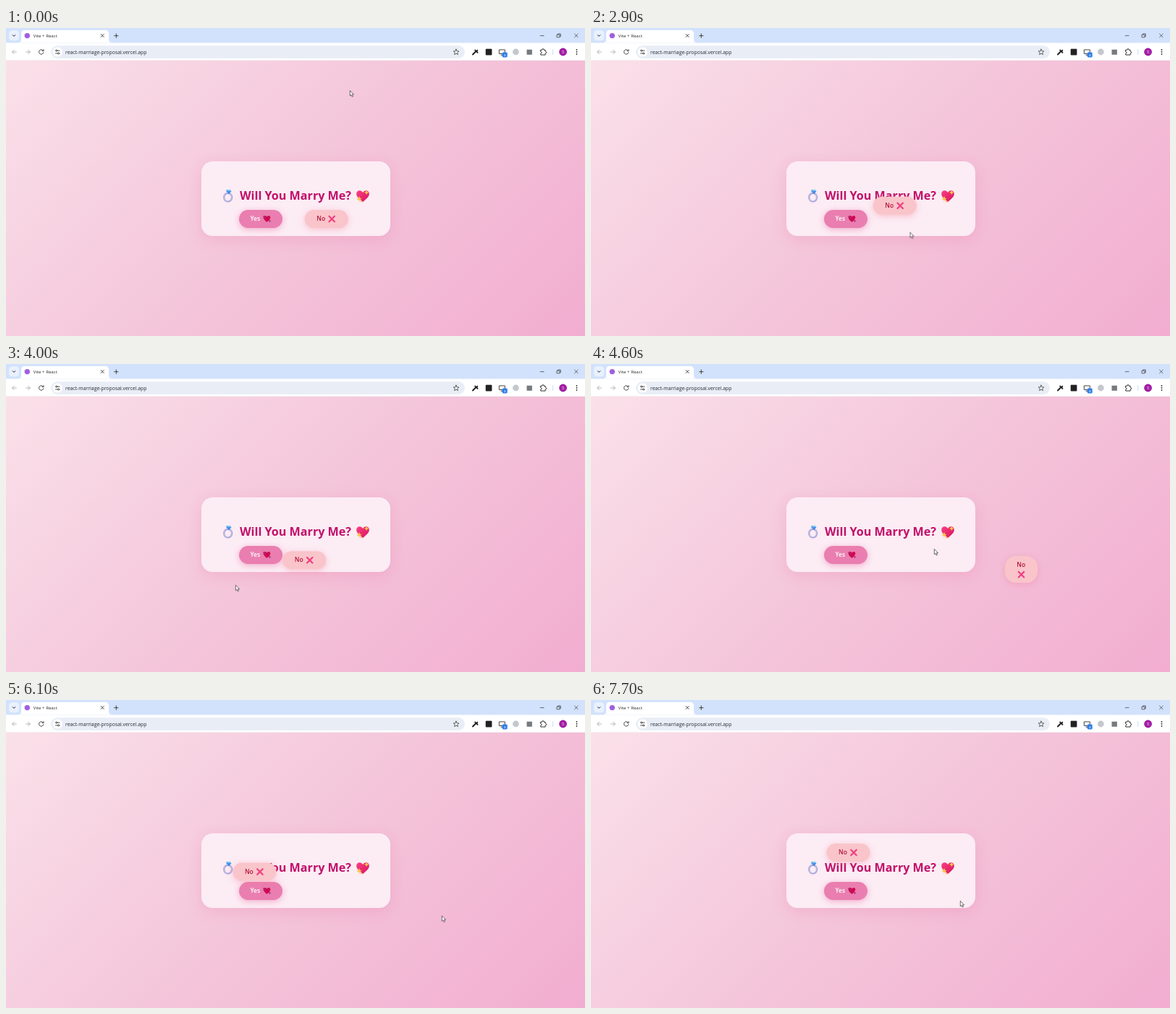
These frames come from a looping animation (800 by 425 pixels, 8 s). An HTML page:

```html
<!DOCTYPE html>
<html lang="en">
<head>
<meta charset="utf-8">
<title>Proposal page</title>
<style>
html, body { margin: 0; width: 100%; height: 100%; overflow: hidden; }
body { font-family: "Open Sans", "Noto Sans", sans-serif; background: #fff; }
.stage { position: relative; width: 800px; height: 425px; overflow: hidden; }
.stage > * { position: absolute; }
.chrome { left: 0; top: 0; }
.page {
  left: 0; top: 45px; width: 800px; height: 380px;
  background: linear-gradient(135deg, #fae0e9, #f4c5da 50%, #f2add0);
}
.card {
  left: 269.5px; top: 184px; width: 261px; height: 102.6px;
  border-radius: 15.6px; background: #fcecf4;
  box-shadow: 0 5px 20px rgba(225, 60, 130, .15);
}
h1 {
  left: 200px; top: 219px; width: 400px; margin: 0;
  font-size: 16.15px; line-height: 24px; font-weight: 700;
  text-align: center; white-space: nowrap; color: #c2106a;
}
.btn {
  display: flex; flex-wrap: wrap; justify-content: center; column-gap: 4px;
  box-sizing: border-box; padding: 6.2px 15px; border-radius: 15.6px;
  font-size: 8.5px; line-height: 12.5px; font-weight: 600;
}
.btn svg { width: 11px; height: 12.5px; }
.yes {
  left: 321.5px; top: 251px; width: 60.5px; color: #fff; background: #ea7eb0;
  box-shadow: 0 2px 8px rgba(230, 70, 140, .38);
}
.no {
  left: 0; top: 0; width: 60px; color: #b3123f; background: #f9c5ca;
  box-shadow: 0 2px 8px rgba(244, 120, 150, .38);
  animation: dodge 8s step-end infinite;
}
.arrow, .beam { left: 0; top: 0; overflow: visible; }
.arrow { animation: point 8s step-end infinite; }
.beam { opacity: 0; animation: beam 8s step-end infinite; }

/* each stop is one 100 ms step: 1.25% of the loop */
@keyframes dodge {
  0% { transform: translate(412.7px, 251px); width: 60px; }
  36.25% { transform: translate(389.7px, 232.7px); }
  37.5% { transform: translate(373px, 219px); }
  38.75% { transform: translate(368px, 215px); }
  40% { transform: translate(367px, 214px); }
  43.75% { transform: translate(335px, 246px); }
  45% { transform: translate(304px, 274px); }
  46.25% { transform: translate(296px, 281px); }
  50% { transform: translate(382.2px, 258.2px); }
  51.25% { transform: translate(440px, 242px); }
  52.5% { transform: translate(462px, 236px); width: 60px; }
  57.5% { transform: translate(572px, 265px); width: 44.5px; }
  58.75% { transform: translate(648px, 284px); }
  60% { transform: translate(673.7px, 291px); }
  73.75% { transform: translate(545px, 267px); width: 44.5px; }
  75% { transform: translate(375px, 236px); width: 60px; }
  76.25% { transform: translate(313.4px, 224.5px); }
  77.5% { transform: translate(311px, 224px); }
  83.75% { transform: translate(408px, 243px); width: 60px; }
  85% { transform: translate(476px, 256px); width: 44.5px; }
  86.25% { transform: translate(496px, 260.3px); }
  87.5% { transform: translate(500px, 261px); width: 44.5px; }
  93.75% { transform: translate(410px, 229px); width: 60px; }
  95% { transform: translate(342px, 204px); }
  96.25%, 100% { transform: translate(325.5px, 198px); width: 60px; }
}
@keyframes point {
  0% { transform: translate(475px, 86px); opacity: 1; }
  15% { transform: translate(395px, 261px); }
  36.25% { transform: translate(440.5px, 281.5px); }
  37.5% { transform: translate(432px, 276px); }
  38.75% { transform: translate(424px, 268px); }
  40% { transform: translate(419px, 260px); }
  43.75% { transform: translate(390px, 236px); }
  45% { transform: translate(370px, 256px); }
  46.25% { transform: translate(358px, 270px); }
  50% { transform: translate(317px, 304.8px); }
  51.25% { transform: translate(340px, 296px); }
  52.5% { transform: translate(390px, 276px); }
  57.5% { transform: translate(474px, 255px); }
  58.75% { transform: translate(486px, 252px); }
  60% { transform: translate(490px, 251px); }
  66.25% { transform: translate(495px, 251px); }
  67.5% { transform: translate(530px, 264px); }
  70% { transform: translate(590px, 284px); }
  71.25% { transform: translate(650px, 298px); }
  72.5% { transform: translate(680px, 304px); }
  73.75% { transform: translate(676px, 304px); }
  75% { transform: translate(640px, 301px); }
  76.25% { transform: translate(602px, 297.5px); }
  77.5% { transform: translate(580px, 294px); }
  80% { transform: translate(450px, 262px); }
  83.75% { transform: translate(371px, 236px); opacity: 1; }
  85% { opacity: 0; }
  92.5% { transform: translate(470px, 263px); opacity: 1; }
  93.75% { transform: translate(505px, 276px); }
  95%, 100% { transform: translate(510px, 277px); opacity: 1; }
}
@keyframes beam { 85% { opacity: 1; } 92.5%, 100% { opacity: 0; } }
</style>
</head>
<body>
<div class="stage">
  <div class="page"></div>
  <div class="card"></div>
  <h1>Will You Marry Me?</h1>

  <svg style="left:298px;top:221px" width="18" height="20" viewBox="0 0 18 20">
    <ellipse cx="8.6" cy="12.6" rx="5.5" ry="5.8" fill="none" stroke="#9b93d2" stroke-width="2.3"/>
    <ellipse cx="8.3" cy="12.2" rx="5.5" ry="5.7" fill="none" stroke="#cbc4ea" stroke-width="1.2"/>
    <path d="M5.8 3.6 7.6 2h4.2l1.6 2.2-3.4 4.2Z" fill="#3f8ee4"/>
    <path d="M5.8 3.6 7.6 2h4.2l1.6 2.2Z" fill="#86c8f7"/>
  </svg>
  <svg style="left:483px;top:221.5px" width="20" height="20" viewBox="0 0 20 20">
    <defs>
      <linearGradient id="rose" x1="0" y1="0" x2="1" y2="1">
        <stop offset="0" stop-color="#f9417f"/><stop offset="1" stop-color="#d9105f"/>
      </linearGradient>
      <path id="heart" d="M10 18C3 12.5 1.2 9.6 1.2 6.7 1.2 3.7 3.3 2.2 5.6 2.2 7.6 2.2 9 3.4 10 5 11 3.4 12.4 2.2 14.4 2.2c2.3 0 4.4 1.5 4.4 4.5 0 2.9-1.8 5.8-8.8 11.3Z"/>
      <path id="spark" d="M0-4Q.6-.6 4 0 .6.6 0 4-.6.6-4 0-.6-.6 0-4Z"/>
    </defs>
    <use href="#heart" fill="url(#rose)"/>
    <g fill="#fbc54a">
      <use href="#spark" transform="translate(5 13.8)"/>
      <use href="#spark" transform="translate(15.2 5) scale(.8)"/>
      <use href="#spark" transform="translate(8.2 17.4) scale(.45)"/>
    </g>
  </svg>

  <div class="btn yes"><span>Yes</span>
    <svg viewBox="0 0 20 22">
      <path d="M1 5 19 18" stroke="#7b3d9c" stroke-width="2"/>
      <use href="#heart" y="1" fill="#d0094f"/>
      <path d="m1 3 5 6M1 6l6 3" stroke="#8d3f94" stroke-width="1.6"/>
      <path d="m14 14 5 1-1 5Z" fill="#a52c78"/>
    </svg>
  </div>
  <div class="btn no"><span>No</span>
    <svg viewBox="0 0 22 25">
      <path d="m3.5 5.5 15 15m0-15-15 15" stroke="#ef3f80" stroke-width="4.4" stroke-linecap="round"/>
    </svg>
  </div>

  <svg class="chrome" width="800" height="45" viewBox="0 0 800 45" fill="none" stroke-linecap="round" stroke-linejoin="round">
    <path d="M0 0h800v45H0z" fill="#fff"/>
    <path d="M0 0h800v20.5H0z" fill="#d3e2fc"/>
    <rect x="4" y="3.3" width="14" height="14" rx="4.5" fill="#e9f1fe"/>
    <path d="m9.2 9.6 1.8 1.8 1.8-1.8" stroke="#222" stroke-width="1"/>
    <path d="M16 20.5q5 0 5-5V8q0-5 5-5H137q5 0 5 5v7.5q0 5 5 5Z" fill="#fff"/>
    <circle cx="29.3" cy="10.6" r="3.7" fill="#a05fe0"/>
    <g stroke="#333" stroke-width=".9">
      <path d="m131.2 8.5 4 4m0-4-4 4M152.3 8v5.4m-2.7-2.7h5.4"/>
      <path d="M738.3 10.6h4.8m42.5-2.4 4.6 4.6m0-4.6-4.6 4.6" stroke-width=".7"/>
      <path d="M761.4 9.2h3.7v3.6h-3.7zM762.6 8.9V8h3.7v3.7h-.9" stroke-width=".7"/>
    </g>
    <g stroke="#b3b5b8" stroke-width="1">
      <path d="M14.3 33H8.7m2.6-2.7L8.6 33l2.7 2.7M27.7 33h5.6m-2.6-2.7 2.7 2.7-2.7 2.7"/>
    </g>
    <path d="M51.5 31.3a3.2 3.2 0 1 0 .4 2.5M52 29.7v2h-2" stroke="#444" stroke-width="1"/>
    <rect x="62" y="24.3" width="572" height="17.6" rx="8.8" fill="#e9eef6"/>
    <circle cx="71.2" cy="33" r="6.6" fill="#fff"/>
    <g stroke="#444" stroke-width=".9">
      <path d="M68.5 31.2h.2m2.8 0h2.6M68.4 35h2.5m2.8 0h.3"/>
      <circle cx="69.8" cy="31.2" r="1.1"/><circle cx="72.5" cy="35" r="1.1"/>
    </g>
    <path d="m622 29.2 1.1 2.6 2.8.2-2.1 1.9.6 2.8-2.4-1.5-2.4 1.5.6-2.8-2.1-1.9 2.8-.2Z" stroke="#444" stroke-width=".8"/>
    <path d="m645 36.5 4-4" stroke="#222" stroke-width="2"/>
    <path d="m648.2 30.6 3.3 3.3m-1.5-1.7 1.3-1.3" stroke="#222" stroke-width="2"/>
    <rect x="662.7" y="28.8" width="8.7" height="8.7" rx="1" fill="#222"/>
    <path d="M681.7 30h7.6v5.5h-7.6zM684 37.4h2" stroke="#444" stroke-width="1"/>
    <rect x="685.7" y="33.4" width="7" height="7" rx="1.6" fill="#2b7de9"/>
    <circle cx="704.4" cy="33" r="4.4" fill="#c4c8cd"/>
    <rect x="719.5" y="29.8" width="7.4" height="7" fill="#777a7e"/>
    <path d="M738.8 30.4h2v-.5a1.2 1.2 0 0 1 2.4 0v.5h2v2.1h.4a1.2 1.2 0 0 1 0 2.4h-.4v2.2h-6.4v-2a1.3 1.3 0 0 0 0-2.6Z" stroke="#333" stroke-width="1"/>
    <path d="M755.7 29.5v7" stroke="#c9dbf7" stroke-width="1"/>
    <circle cx="769.6" cy="33" r="5.4" fill="#a220a6"/>
    <g fill="#333">
      <circle cx="788.5" cy="30" r=".9"/><circle cx="788.5" cy="33" r=".9"/><circle cx="788.5" cy="36" r=".9"/>
    </g>
    <g fill="#262a30">
      <text x="37.8" y="12.8" font-size="6.1">Vite + React</text>
      <text x="82" y="35.5" font-size="6.88">react-marriage-proposal.vercel.app</text>
      <text x="769.6" y="34.9" font-size="5.2" text-anchor="middle" fill="#fff">S</text>
      <text x="689.2" y="38.7" font-size="4.6" text-anchor="middle" fill="#fff">a</text>
    </g>
    <path d="M0 44.6h800" stroke="#f3e6ee" stroke-width=".8"/>
  </svg>

  <svg class="beam" width="10" height="10">
    <path d="M374 231.3h3m-1.5 0v6.6m-1.5 0h3" fill="none" stroke="#4a2035" stroke-width=".7"/>
  </svg>
  <svg class="arrow" width="10" height="12">
    <path d="M.3.3v7.4l1.7-1.5 1.2 2.7 1.3-.6-1.2-2.6h2.2Z" fill="#fff" stroke="#333" stroke-width=".7" stroke-linejoin="round"/>
  </svg>
</div>
</body>
</html>
```
